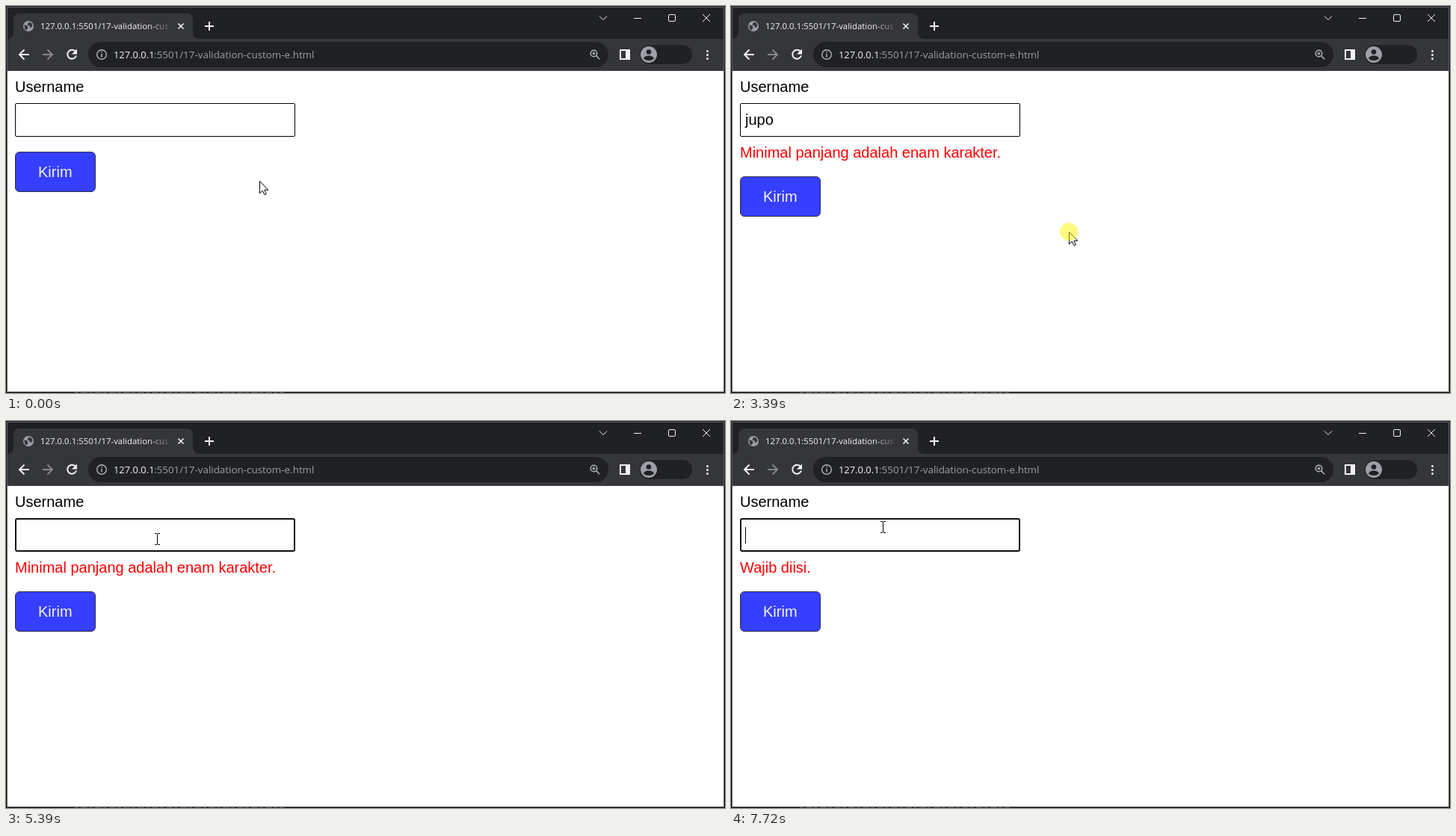
Animation of 962 by 518 pixels, one loop 8 s. Source, as an HTML page:

```html
<!DOCTYPE html>
<html lang="id">
<head>
<meta charset="utf-8">
<title>Form validation</title>
<style>
  html, body { margin: 0; width: 100%; height: 100%; overflow: hidden; background: #fff; }
  svg { display: block; }
  .ui { font-family: "Open Sans", "Noto Sans", sans-serif; font-size: 11.4px; fill: #f1f3f4; }
  .page { font-family: "Liberation Sans", Arial, sans-serif; font-size: 20px; fill: #000; }
  .line { fill: none; stroke: #f1f3f4; }
</style>
</head>
<body>
<svg width="962" height="518" viewBox="0 0 962 518">
  <defs>
    <linearGradient id="fade" gradientUnits="userSpaceOnUse" x1="190" x2="219">
      <stop offset="0" stop-color="#f1f3f4"/>
      <stop offset="1" stop-color="#f1f3f4" stop-opacity=".15"/>
    </linearGradient>
    <clipPath id="tabClip"><rect x="46" y="14" width="172" height="26"/></clipPath>
  </defs>

  <!-- window -->
  <rect width="962" height="518" fill="#fff"/>
  <rect width="962" height="44" fill="#202124"/>
  <rect y="44" width="962" height="43" fill="#35363a"/>
  <path d="M2 44a8 8 0 0 0 8-8V18a8 8 0 0 1 8-8H242a8 8 0 0 1 8 8V36a8 8 0 0 0 8 8z" fill="#35363a"/>
  <path d="M2 86.5H960" stroke="#48494c"/>

  <!-- tab -->
  <circle cx="30" cy="27" r="7" fill="#9aa0a6"/>
  <path d="M24.5 25l4 1.5 1 2.5-2 3.5-2.500-2zM30 21.500l4.500 1.500 1 4-3 2.500-1-3-3-1z" fill="#35363a"/>
  <g clip-path="url(#tabClip)">
    <text class="ui" x="46" y="31" style="fill:url(#fade)">127.0.0.1:5501/17-validation-custom</text>
  </g>
  <path class="line" d="M230.500 23.500l7 7m0-7l-7 7" stroke-width="1.600"/>
  <path class="line" d="M266 27h12m-6-6v12" stroke-width="2"/>

  <!-- window buttons -->
  <path class="line" d="M794 13.500l5 5 5-5M840 16.500h10M932 11l10 10m0-10l-10 10"/>
  <rect class="line" x="886.500" y="11.500" width="9" height="9" rx="1.500"/>

  <!-- toolbar -->
  <path class="line" d="M31 65H18.500m6-6.500l-6.500 6.500 6.500 6.500" stroke-width="2"/>
  <path class="line" d="M49 65h12.500m-6-6.500l6.500 6.500-6.500 6.500" stroke-width="2" style="stroke:#85878a"/>
  <path class="line" d="M93.200 61.200A6 6 0 1 0 94 66.500" stroke-width="2"/>
  <path d="M95 57.500v7h-7z" fill="#f1f3f4"/>
  <rect x="110" y="48" width="696" height="34" rx="17" fill="#202124"/>
  <circle class="line" cx="128" cy="65" r="6.300" stroke-width="1.400" style="stroke:#b2b5b9"/>
  <path d="M128 64v4.500m0-7.500v1.600" stroke="#b2b5b9" stroke-width="1.500"/>
  <g class="ui">
    <text x="144" y="70" font-size="13" style="font-size:12.900px">127.0.0.1</text>
    <text x="198" y="70" style="font-size:13.400px;fill:#9aa0a6">:5501/17-validation-custom-e.html</text>
    <text x="879" y="69" id="guest"></text>
  </g>
  <g class="line" stroke-width="1.500" style="stroke:#b2b5b9">
    <circle cx="786.500" cy="63.500" r="4.300"/>
    <path d="M789.500 66.500l4.700 4.700M784.500 63.500h4m-2-2v4"/>
  </g>
  <rect class="line" x="822" y="59" width="12" height="12" stroke-width="2"/>
  <path d="M829 58h6v14h-6z" fill="#f1f3f4"/>
  <rect x="847" y="51.500" width="72" height="27" rx="13.500" fill="#202124" stroke="#3c3d40"/>
  <circle cx="860" cy="65" r="11" fill="#9aa0a6"/>
  <circle cx="860" cy="61.500" r="3.300" fill="#202124"/>
  <path d="M853 70.500c1-5.500 13-5.500 14 0q-7 5-14 0z" fill="#202124"/>
  <g fill="#f1f3f4">
    <circle cx="938.500" cy="60.500" r="1.500"/><circle cx="938.500" cy="65.500" r="1.500"/><circle cx="938.500" cy="70.500" r="1.500"/>
  </g>

  <!-- frame -->
  <rect x=".5" y=".5" width="961" height="517" fill="none" stroke="#161616"/>
  <rect x="1.500" y="1.500" width="959" height="515" fill="none" stroke="#606164"/>
  <path d="M92 517.500H372" stroke="#555" stroke-dasharray="5 3 9 2"/>

  <!-- form -->
  <g class="page">
    <text x="12" y="115">Username</text>
    <rect id="box" fill="#fff" stroke="#000"/>
    <rect id="select" x="19" y="141" width="38" height="23" fill="#0078d7"/>
    <text id="value" x="19" y="159"></text>
    <rect id="caret" y="142" width="1" height="22"/>
    <text id="message" x="12" y="203" fill="#f00" style="fill:#f00"></text>
    <g id="button">
      <rect x="12.500" y="195.500" width="107" height="53" rx="5.500" fill="#363fff" stroke="#30313f"/>
      <text x="43" y="229" fill="#f4f4f4">Kirim</text>
    </g>
  </g>

  <!-- pointer -->
  <g id="pointer">
    <path id="arrow" d="M.5.500V16.700L4.300 13.200 7 18.700 9.400 17.600 6.900 12.200H11.800z" fill="#fff" stroke="#000"/>
    <path id="beam" d="M-3 -7.500H0M1 -7.500H4M.5 -7V7M-3 7.500H0M1 7.500H4" fill="none" stroke="#000"/>
    <circle id="click" r="12" fill="#fff600" opacity=".5"/>
  </g>
</svg>
<script>
const LOOP = 8000;
const $ = id => document.getElementById(id);
const NAME = "jupo";
const SHORT = "Minimal panjang adalah enam karakter.";
const EMPTY = "Wajib diisi.";

// Each track holds [time, value...] rows; a value stays until the next row.
const path = [
  [0, 339, 234], [850, 328, 228], [925, 288, 207], [1000, 242, 184], [1075, 208, 166], [1150, 199, 161],
  [3170, 245, 187], [3245, 368, 254], [3320, 452, 302],
  [3910, 435, 292], [3990, 375, 258], [4070, 295, 211], [4150, 232, 175], [4230, 206, 160], [4310, 202, 158],
  [5460, 240, 183], [5540, 340, 250], [5610, 418, 302], [5690, 441, 317],
  [6740, 422, 302], [6815, 350, 250], [6890, 264, 186], [6965, 214, 150], [7040, 203, 142]
];
const clicks = [[0, 0], [1150, 1], [1300, 0], [3320, 1], [3540, 0], [4310, 1], [4460, 0],
  [5690, 1], [5910, 0], [7570, 1], [7720, 0]];
const focus = [[0, 0], [1225, 1], [3390, 0], [4385, 1], [5760, 0], [7645, 1]];
const caret = [[0, 0], [1225, 1], [1750, 0], [1900, 1], [3020, 0], [4385, 1],
  [4680, 0], [4830, 1], [5390, 0], [7645, 1]];
const typed = [[0, 0], [1900, 1], [2050, 2], [2200, 3], [2430, 4], [4830, 0]];
const selected = [[0, 0], [4680, 1], [4830, 0]];
const messages = [[0, ""], [3390, SHORT], [5760, EMPTY]];

const row = (track, t) => track.findLast(r => r[0] <= t);
const at = (track, t) => row(track, t)[1];
const show = (id, on) => $(id).setAttribute("visibility", on ? "visible" : "hidden");
const set = (id, attrs) => {
  for (const key in attrs) $(id).setAttribute(key, attrs[key]);
};

function draw(t) {
  const [, x, y] = row(path, t);
  const inField = x > 12 && x < 387 && y > 130 && y < 175;
  set("pointer", { transform: `translate(${x} ${y})` });
  show("arrow", !inField);
  show("beam", inField);
  show("click", at(clicks, t));

  const w = at(focus, t) ? 2 : 1;
  set("box", {
    x: 12 + w / 2, y: 130 + w / 2, width: 375 - w, height: 45 - w,
    rx: 1 + w / 2, "stroke-width": w, stroke: w > 1 ? "#101010" : "#000"
  });

  const count = at(typed, t);
  const marked = at(selected, t);
  $("value").textContent = NAME.slice(0, count);
  $("value").style.fill = marked ? "#fff" : "#000";
  show("select", marked);
  show("caret", at(caret, t));
  set("caret", { x: count ? Math.floor(12.320 + 11.120 * count) : 19 });

  const text = at(messages, t);
  $("message").textContent = text;
  set("button", { transform: `translate(0 ${text ? 33 : 0})` });
}

$("guest").textContent = "Guest";
const start = performance.now();
function tick() {
  draw((performance.now() - start) % LOOP);
  requestAnimationFrame(tick);
}
tick();
</script>
</body>
</html>
```
